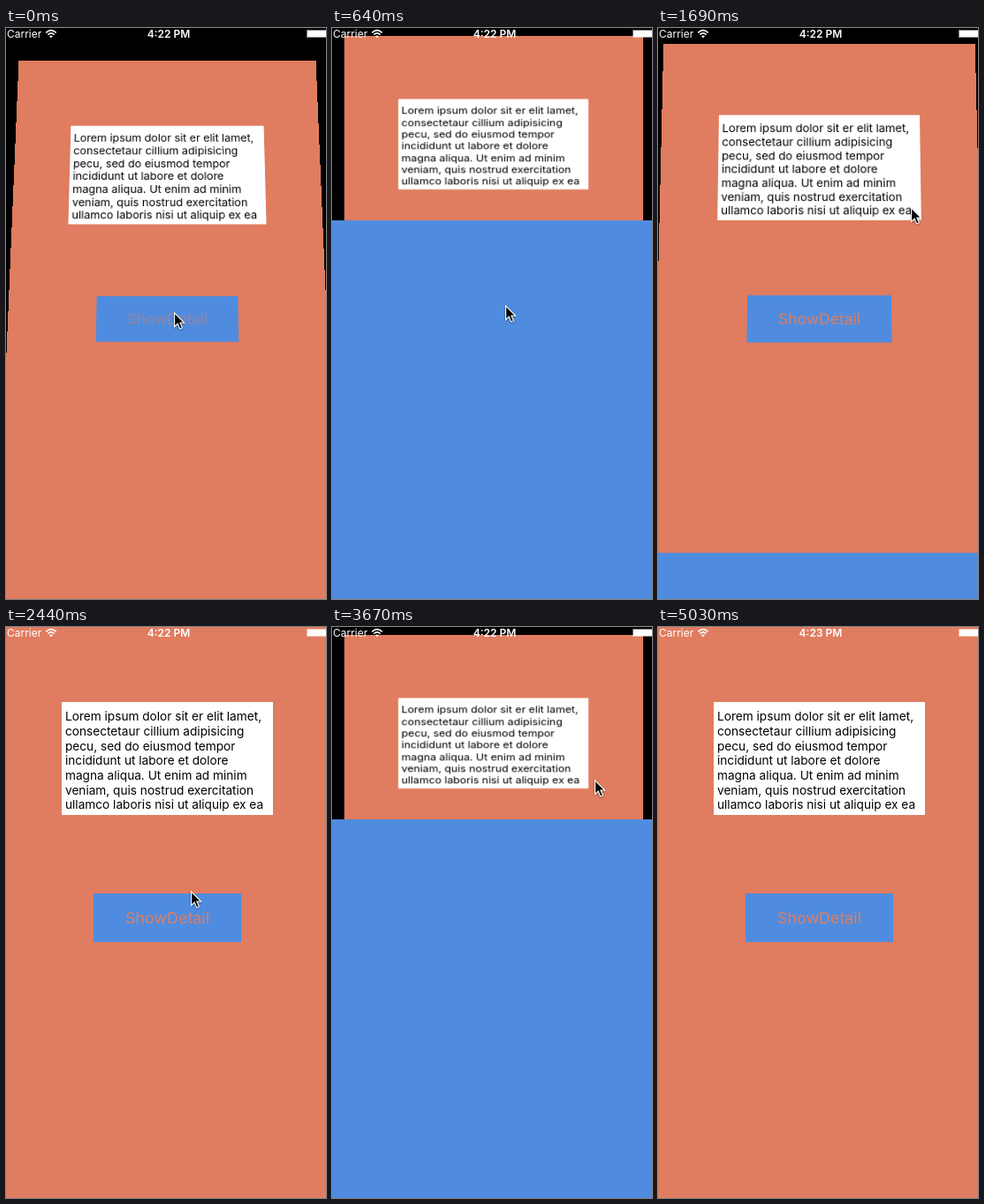
An HTML page for the animation above (5.55 s loop, 362 by 647 pixels).

```html
<!DOCTYPE html>
<html lang="en">
<head>
<meta charset="utf-8">
<title>Semi-modal transition</title>
<style>
  html, body { margin: 0; width: 100%; height: 100%; overflow: hidden; background: #000; }
  body { position: relative; font-family: Inter, Roboto, sans-serif; }
  #stage { position: absolute; left: 0; top: 0; width: 362px; height: 647px; overflow: hidden; background: #000; }
  #stage > * { position: absolute; }
  #view, #panel { left: -5px; top: -4px; width: 375px; height: 667px; }
  #view { background: #e07c5f; }
  #panel { background: #4f8cdf; }
  #note, #button { position: absolute; }
  #note {
    left: 68px; top: 89px; width: 239px; height: 128px; box-sizing: border-box;
    padding: 8.2px 4px 0; overflow: hidden; background: #fff; color: #000;
    font-size: 13.65px; line-height: 16.7px; white-space: pre;
  }
  #button {
    left: 104px; top: 306px; width: 167px; height: 55px; background: #4f8cdf;
    color: #e07c5f; font-size: 17.9px; line-height: 55px; text-align: center;
  }
  .status { top: 0; color: #fff; font-size: 12px; line-height: 13px; white-space: pre; }
  #clock { left: 134px; width: 100px; text-align: center; font-weight: 600; }
  #battery {
    left: 340px; top: 2px; width: 22px; height: 9px; box-sizing: border-box;
    border: solid rgba(255, 255, 255, .5); border-width: 1px 0 1px 1px;
    background: #fff content-box;
  }
  #wifi { left: 44px; top: 1px; }
  #cursor { left: 0; top: 0; overflow: visible; filter: drop-shadow(0 1px 1px rgba(0, 0, 0, .35)); }
</style>
</head>
<body>
<div id="stage">
  <div id="view">
    <div id="note">Lorem ipsum dolor sit er elit lamet,
consectetaur cillium adipisicing
pecu, sed do eiusmod tempor
incididunt ut labore et dolore
magna aliqua. Ut enim ad minim
veniam, quis nostrud exercitation
ullamco laboris nisi ut aliquip ex ea</div>
    <div id="button"><span id="title">ShowDetail</span></div>
  </div>
  <div id="panel"></div>
  <div class="status" style="left:1px">Carrier</div>
  <svg id="wifi" width="14" height="11" fill="none" stroke="#fff" stroke-width="1.6">
    <path d="M1.3 4.4Q7 -1 12.7 4.4M3.4 6.6Q7 3.3 10.6 6.6"/>
    <path d="M7 10.3L4.9 8.2Q7 6.6 9.1 8.2Z" fill="#fff" stroke="none"/>
  </svg>
  <div class="status" id="clock"></div>
  <div id="battery"></div>
  <svg id="cursor" width="14" height="22">
    <path d="M.6 .9V16.4L4.2 13 6.7 18.9 9.4 17.8 6.9 12H11.6Z" fill="#000" stroke="#fff" stroke-width="1.1"/>
  </svg>
</div>
<script>
const LOOP = 5550;
const PANEL_MS = 250, PANEL_TRAVEL = 445;
const PRESS = 2900, CLOCK_TICK = 4600;

// Poses: tilt in degrees, scale x, scale y, shift y
const REST = [0, 1, 1, 0], TILT = [15, .95, .95, 0], BACK = [0, .9, .8, -53.4];

const OPEN = { from: REST, to: BACK, ms: 250, lag: 40 };
const CLOSE = { from: BACK, to: REST, ms: 295, lag: 25 };
const moves = [
  { at: -71, kind: OPEN }, { at: 1484, kind: CLOSE },
  { at: 3016, kind: OPEN }, { at: 4221, kind: CLOSE }
];

// The pointer glides from one resting place to the next.
const onButton = [190, 322], onNote = [286, 203], besideNote = [297, 173], offStage = [285, 650];
const glides = [
  { start: 600, end: 1230, from: onButton, to: onNote },
  { start: 1740, end: 2610, from: onNote, to: onButton },
  { start: 3150, end: 3650, from: onButton, to: besideNote },
  { start: 4350, end: 4900, from: besideNote, to: offStage }
];

const $ = id => document.getElementById(id);
const clamp = v => Math.max(0, Math.min(1, v));
const mix = (a, b, p) => a.map((v, i) => v + (b[i] - v) * p);

// Cubic timing curve with control points (x1, 0) and (x2, 1)
function curve(x1, x2) {
  return u => {
    if (u <= 0 || u >= 1) return clamp(u);
    let lo = 0, hi = 1, s;
    for (let i = 0; i < 24; i++) {
      s = (lo + hi) / 2;
      const x = 3 * (1 - s) ** 2 * s * x1 + 3 * (1 - s) * s * s * x2 + s ** 3;
      if (x < u) lo = s; else hi = s;
    }
    return 3 * (1 - s) * s * s + s ** 3;
  };
}
const easeOut = curve(0, .58), easeInOut = curve(.42, .58);

function pointerAt(t) {
  const g = glides.filter(g => g.start <= t).pop() || glides[0];
  return mix(g.from, g.to, clamp((t - g.start) / (g.end - g.start)));
}

// First half tilts the view back, second half settles it.
function viewPose({ from, to }, u) {
  return u < .5 ? mix(from, TILT, easeOut(u * 2)) : mix(TILT, to, easeOut(u * 2 - 1));
}

function draw(t) {
  const { at, kind } = moves.filter(m => m.at <= t).pop();
  const age = t - at;
  const [tilt, sx, sy, shift] = viewPose(kind, age / kind.ms);
  const slide = easeInOut((age - kind.lag) / PANEL_MS);
  const raised = kind === OPEN ? slide : 1 - slide;
  const pressed = kind === CLOSE && t >= PRESS && t < moves[2].at;

  $('view').style.transform =
    `perspective(900px) translateY(${shift}px) scale(${sx}, ${sy}) rotateX(${tilt}deg)`;
  $('panel').style.transform = `translateY(${667 - PANEL_TRAVEL * raised}px)`;
  $('title').style.opacity = kind === OPEN ? clamp(.2 + age / 250) : pressed ? .2 : 1;
  $('clock').textContent = t < CLOCK_TICK ? '4:22 PM' : '4:23 PM';
  const [x, y] = pointerAt(t).map(Math.round);
  $('cursor').style.transform = `translate(${x}px, ${y}px)`;
}

const start = performance.now();
function frame() {
  draw((performance.now() - start) % LOOP);
  requestAnimationFrame(frame);
}
frame();
</script>
</body>
</html>
```
